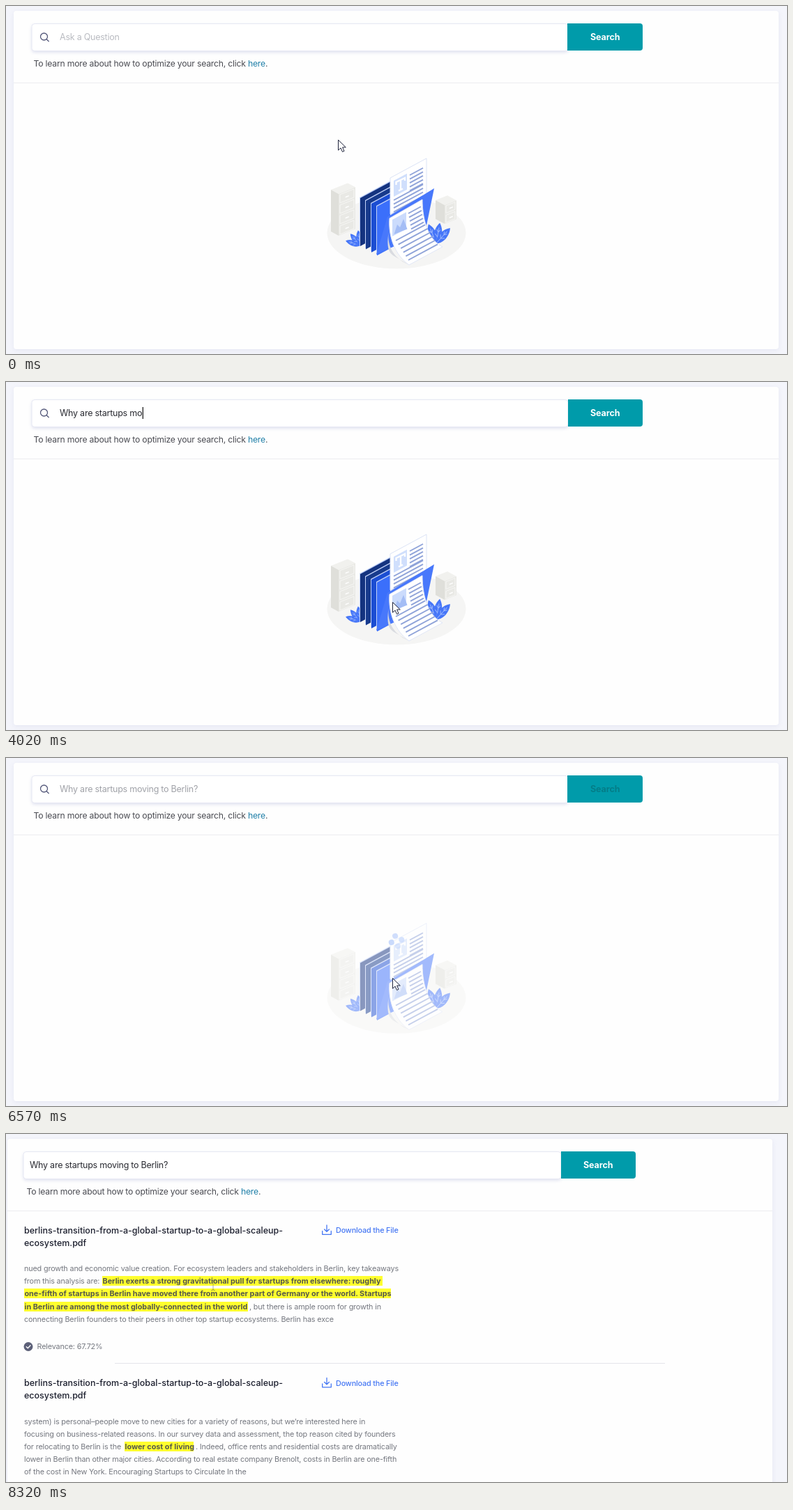
Animation, 1120 px wide and 500 px high, one loop 8400 ms. Source, as an HTML page:

```html
<!DOCTYPE html>
<html lang="en">
<head>
<meta charset="utf-8">
<title>Document search</title>
<style>
html, body { margin: 0; height: 100%; overflow: hidden; background: #f4f5fb; }
svg { display: block; width: 100vw; height: 100vh; }
text { font-family: Inter, "Open Sans", sans-serif; white-space: pre; }
.card { fill: #fefefe; filter: drop-shadow(0 2px 3px #c9cde455); }
.field { fill: #fff; stroke: #e6e8f3; filter: drop-shadow(0 2px 2px #bcc2e070); }
.input { font-size: 12.5px; letter-spacing: -.24px; }
.caption { font-size: 12.2px; letter-spacing: -.21px; fill: #4a4b52; }
.button { font-size: 12.5px; font-weight: 700; letter-spacing: -.1px; }
.title { font-size: 12.5px; font-weight: 500; fill: #1c1f2e; }
.body, .bold, .link { font-size: 10.8px; letter-spacing: -.15px; fill: #74777f; }
.bold { font-weight: 700; letter-spacing: 0; fill: #56584a; }
.link { font-weight: 500; fill: #4577f3; }
.icon { fill: none; stroke-width: 1.3; stroke-linecap: round; stroke-linejoin: round; }
</style>
</head>
<body>
<svg viewBox="0 0 1120 500">
  <rect id="card" class="card" y="7" width="1097" rx="4"/>
  <path id="rule" d="M0 110.500H1097" stroke="#ececf0"/>
  <rect id="field" class="field" y="25.500" height="39" rx="4"/>
  <g id="bar">
    <path id="button" fill="#009baa"/>
    <text id="label" class="button" x="838" y="49">Search</text>
    <text class="caption" x="39.500" y="86.500">To learn more about how to optimize your search, click <tspan fill="#1f7fa8">here</tspan>.</text>
  </g>
  <path id="lens" class="icon" stroke="#54587a" d="M59.500 44a5 5 0 1 1-10 0a5 5 0 1 1 10 0M58.200 47.700l3 3"/>
  <text id="query" class="input" y="48.800"></text>
  <rect id="caret" y="36" width="1.300" height="17" fill="#222"/>
  <g id="empty"></g>
  <g id="spinner" fill="#c9dafc"></g>
  <g id="results"></g>
  <path id="arrow" d="M.500.500V15.200L4 12L6.500 17.500L9 16.400L6.600 11H11.300Z" fill="#fff" stroke="#20253d" stroke-linejoin="round"/>
  <path id="beam" d="M-3-8Q0-8 0-6Q0-8 3-8M0-6V6M-3 8Q0 8 0 6Q0 8 3 8" fill="none" stroke="#555" opacity=".5"/>
</svg>
<script>
const LOOP = 8400, CLICK = 480, TYPE = 1130, ENTER = 6020, SHOW = 6640;
const QUESTION = 'Why are startups moving to Berlin?';
const $ = id => document.getElementById(id);
const set = (id, attrs) => { for (const k in attrs) $(id).setAttribute(k, attrs[k]); };
const show = (id, on) => { $(id).style.display = on ? '' : 'none'; };
const clamp = v => Math.max(0, Math.min(1, v));
const smooth = v => v * v * (3 - 2 * v);
const repeat = (n, f) => Array.from({ length: n }, (_, i) => f(i)).join('');
const text = (x, y, cls, s) => `<text class="${cls}" x="${x}" y="${y}">${s}</text>`;
const path = (d, fill, extra = '') => `<path d="${d}" fill="${fill}" ${extra}/>`;

// upright isometric panel: left edge at x, top left corner at y
const slab = (x, y, w, h, fill, slope = .54, extra = '') =>
  path(`M${x} ${y}l${w} ${-w * slope}v${h}l${-w} ${w * slope}z`, fill, extra);

const rows = (n, x, y, w, dx = 0) => path(
  repeat(n, i => `M${x + i * dx} ${y + i * 5.6}l${w} ${-w * .54}`),
  'none', 'stroke="#8fa3d9" stroke-width="1.9"');

function cabinet(x, y, depth, w, h, drawers) {
  const front = x + depth, top = y + depth * .54, step = h / drawers;
  return path(`M${x} ${y}l${depth} ${depth * .54}l${w} ${-w * .4}l${-depth} ${-depth * .54}z`, '#f1f1ee') +
    slab(x, y, depth, h, '#dfdfda', -.54) + slab(front, top, w, h, '#e9e9e5', .4) +
    repeat(drawers, i => slab(front + 2, top + i * step + 1, w - 4, step - 3, 'none', .4, 'stroke="#f6f6f4"') +
      slab(front + w * .4, top + i * step + 4, 5, 1.5, '#fff', .4));
}

function plant(x, y, from, n, size) {
  return repeat(n, i => `<g transform="translate(${x} ${y}) rotate(${from + i * 32}) scale(${size})">` +
    path('M0 0C-6-5-5-16 0-22C5-16 6-5 0 0', '#4676f8') +
    path('M0 0V-17M-3-10l3 3l3-3M-2-15l2 3l2-3', 'none', 'stroke="#9db8fc" stroke-width=".7"') + '</g>');
}

function illustration() {
  const folder = (fill, i) => {
    const x = 507 + 8 * i, y = 275 + 4 * i, h = 69 + i * .5;
    return slab(x, y, 551 - x, h, '#c3d3fa') + slab(x + 1, y + 1, 550 - x, h, fill);
  };
  return '<ellipse cx="560" cy="326" rx="99.500" ry="51.500" fill="#f5f5f4"/>' +
    cabinet(466, 264, 11, 24, 60, 4) + cabinet(616, 279, 13, 17, 27, 2) +
    plant(508, 344, -72, 3, 1) + plant(617, 341, -22, 3, 1.35) +
    ['#14337f', '#173a8c', '#1b4dd2', '#3b6ffb'].map(folder).join('') +
    // upright page
    slab(551, 247, 52, 52, '#fff', .54, 'stroke="#dbe3f6"') +
    slab(556, 251, 19, 23, '#d0dffc') +
    path('M559.500 257v-4l12.500-6v4M566 250.500v13.500M563 265.500l6-3', 'none', 'stroke="#fff" stroke-width="2.300"') +
    rows(5, 579, 243, 19) + rows(4, 556, 279, 42) +
    // flap and curled page
    path('M547 303L614 262L601 325L531 357Z', '#4878fb') +
    path('M549 322C546 340 552 361 578 372L556 359C547 353 546 343 549 322', '#d9dbe0') +
    path('M550 305L597 278C597 310 607 337 626 346L578 372C558 358 548 332 550 305', '#fff', 'stroke="#e1e7f7"') +
    slab(554, 307, 20, 24, '#cbdbfc') +
    path('M556.500 328l4.500-14l4 4l5-12l5.500 14.500z', '#a4bdf5') +
    rows(5, 577, 298, 18, 1) + rows(6, 559, 337, 42, 3.6);
}

// lines: [row, text, x]; marks: [row, text, x, width]
function result(y, lines, marks) {
  const base = row => y + 59 + row * 18.2;
  return text(26, y + 4.5, 'title', 'berlins-transition-from-a-global-startup-to-a-global-scaleup-') +
    text(26, y + 22.5, 'title', 'ecosystem.pdf') +
    `<path class="icon" stroke="#4577f3" transform="translate(453 ${y - 7})" d="M.700 8.500V13.300H13.300V8.500M7 0V9M3.600 6L7 9.300L10.400 6"/>` +
    text(473, y + 4, 'link', 'Download the File') +
    lines.map(([row, s, x = 26]) => text(x, base(row), 'body', s)).join('') +
    marks.map(([row, s, x, w]) =>
      `<rect x="${x}" y="${Math.round(base(row) - 11)}" width="${w}" height="14" fill="#ffff2e"/>` +
      text(x + .5, base(row), 'bold', s)).join('');
}

$('empty').innerHTML = illustration();
$('spinner').innerHTML = repeat(4, i => `<circle cx="7.500" r="4" transform="rotate(${i * 90})" opacity="${1 - i * .12}"/>`);
$('results').innerHTML =
  result(138, [
    [0, 'nued growth and economic value creation. For ecosystem leaders and stakeholders in Berlin, key takeaways'],
    [1, 'from this analysis are:'],
    [3, ', but there is ample room for growth in', 349],
    [4, 'connecting Berlin founders to their peers in other top startup ecosystems. Berlin has exce']
  ], [
    [1, 'Berlin exerts a strong gravitational pull for startups from elsewhere: roughly', 138, 402],
    [2, 'one-fifth of startups in Berlin have moved there from another part of Germany or the world. Startups', 26, 526],
    [3, 'in Berlin are among the most globally-connected in the world', 26, 321]
  ]) +
  '<circle cx="32" cy="305.500" r="6.500" fill="#5c6078"/>' +
  '<path class="icon" d="M29.200 305.700l2.100 2.100l3.700-4.100" stroke="#fff"/>' +
  text(44.5, 309, 'body', 'Relevance: 67.72%') +
  path('M156 329.500H945', 'none', 'stroke="#e4e5ea"') +
  result(357.5, [
    [0, 'system) is personal–people move to new cities for a variety of reasons, but we’re interested here in'],
    [1, 'focusing on business-related reasons. In our survey data and assessment, the top reason cited by founders'],
    [2, 'for relocating to Berlin is the'],
    [2, '. Indeed, office rents and residential costs are dramatically', 272],
    [3, 'lower in Berlin than other major cities. According to real estate company Brenolt, costs in Berlin are one-fifth'],
    [4, 'of the cost in New York. Encouraging Startups to Circulate In the']
  ], [[2, 'lower cost of living', 170, 99]]);

// pointer moves: from, to, x, y
const MOVES = [[40, 420, 62, 45], [500, 930, 556, 316], [1100, 1200, 554, 316], [7080, 7630, 325, 246], [7700, 8300, 297, 217]];
const pointer = t => MOVES.reduce(([px, py], [from, to, x, y]) => {
  const k = smooth(clamp((t - from) / (to - from)));
  return [px + (x - px) * k, py + (y - py) * k];
}, [476, 192]);

// typing picks up speed slightly
const typed = t => Math.floor(QUESTION.length * clamp((t - TYPE) / 4770) ** 1.14);

function draw(t) {
  const done = t >= SHOW, loading = t >= ENTER && !done, focus = t >= CLICK && t < ENTER;
  const dim = clamp((t - 6300) / 200) - clamp((t - 6810) / 170);
  const left = done ? 2 : 11, edge = focus || done ? 806 : 805;

  set('card', { x: left, height: done ? 520 : 486 });
  set('rule', { transform: `translate(${left})` });
  set('field', { x: done ? 25 : 37, width: done ? 771 : 769, stroke: done ? '#f3f4f9' : '#e6e8f3' });
  set('bar', { transform: `translate(${done ? -10 : 0})` });
  set('button', { d: `M${edge} 25H909q4 0 4 4V60q0 4-4 4H${edge}Z` });
  set('label', { fill: `color-mix(in srgb, #047d88 ${dim * 100}%, #fff)` });
  show('lens', !done);

  const n = typed(t), x = done ? 34 : 77;
  $('query').textContent = n ? QUESTION.slice(0, n) : 'Ask a Question';
  set('query', { x, fill: n ? `color-mix(in srgb, #a0a2a8 ${dim * 100}%, #2a2b32)` : '#b9bbc1' });
  show('caret', focus && (n > 0 || (t - CLICK) % 1060 < 530));
  set('caret', { x: n ? x + $('query').getComputedTextLength() + .5 : 77.5 });

  show('empty', !done);
  set('empty', { transform: `translate(0 ${loading ? 18.5 : 0})`, opacity: 1 - dim / 2 });
  show('spinner', loading);
  set('spinner', { transform: `translate(560 263) rotate(${(t - ENTER) * .3})` });
  show('results', done);
  set('results', { opacity: .5 + .5 * smooth(clamp((t - 6810) / 160)) });

  const [px, py] = pointer(t), transform = `translate(${px} ${py})`;
  const overText = done ? px < 563 && py < 275 : py > 25 && py < 64;
  show('arrow', !overText);
  show('beam', overText);
  set('arrow', { transform });
  set('beam', { transform });
}

const start = performance.now();
function tick(now) {
  draw(Math.max(0, now - start) % LOOP);
  requestAnimationFrame(tick);
}
draw(0);
requestAnimationFrame(tick);
</script>
</body>
</html>
```
